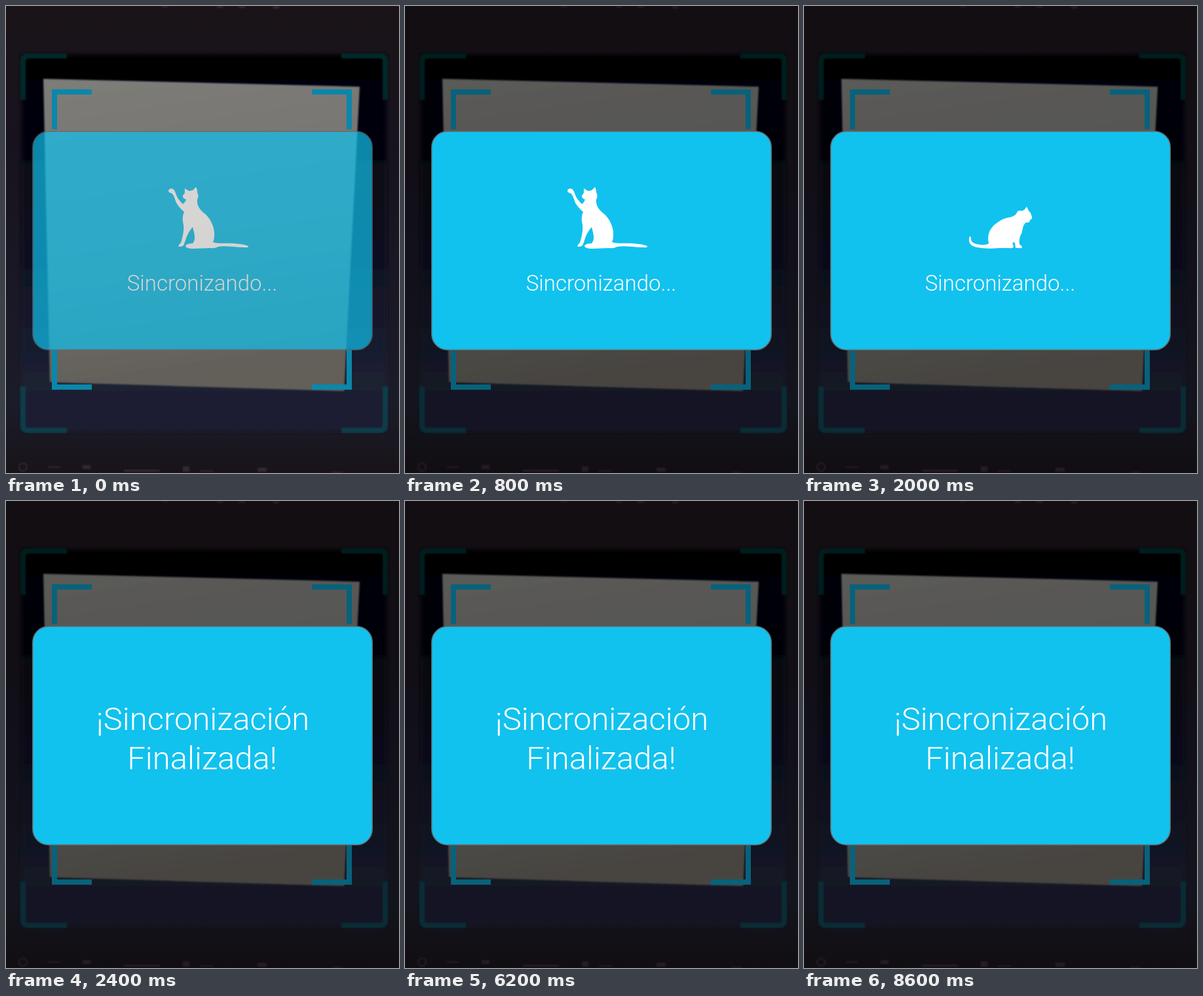
Animation of 600x712 px, one loop 9.4 s. Source, as an HTML page:

```html
<!DOCTYPE html>
<html lang="es">
<head>
<meta charset="utf-8">
<title>Sincronizando</title>
<style>
  html, body { margin: 0; width: 100%; height: 100%; overflow: hidden; background: #171217; }
  svg { display: block; width: 600px; height: 712px; }
  text { font-family: Roboto, "Open Sans", sans-serif; font-weight: 300; fill: #fff; text-anchor: middle; }
  .corner { fill: none; stroke-width: 8; }
</style>
</head>
<body>
<svg viewBox="0 0 600 712">
  <defs>
    <linearGradient id="room" x1="0" y1="0" x2="0" y2="1">
      <stop offset="0" stop-color="#1a1418"/>
      <stop offset=".3" stop-color="#17131e"/>
      <stop offset=".85" stop-color="#1b1c29"/>
      <stop offset="1" stop-color="#181419"/>
    </linearGradient>
    <linearGradient id="screen" x1="0" y1="0" x2="0" y2="1">
      <stop offset="0" stop-color="#020204"/>
      <stop offset=".2" stop-color="#04040c"/>
      <stop offset=".5" stop-color="#0d0e20"/>
      <stop offset=".85" stop-color="#1b2033"/>
      <stop offset="1" stop-color="#1d1f30"/>
    </linearGradient>
    <linearGradient id="sheet" x1="0" y1="0" x2=".15" y2="1">
      <stop offset="0" stop-color="#7d7c79"/>
      <stop offset=".5" stop-color="#75746f"/>
      <stop offset="1" stop-color="#63605a"/>
    </linearGradient>
    <filter id="soft"><feGaussianBlur stdDeviation="3"/></filter>
    <filter id="blur"><feGaussianBlur stdDeviation="1"/></filter>
  </defs>

  <rect width="600" height="712" fill="url(#room)"/>
  <rect x="24" y="74" width="557" height="574" fill="url(#screen)" filter="url(#soft)"/>
  <g fill="#322c33" filter="url(#blur)">
    <path d="M238 0h10v2h-10zM322 0h9v3h-9zM355 0h10v3h-10zM408 0h9v4h-9z"/>
    <path d="M64 702h18v2h-18zM117 700h12v6h-12zM180 707h55v3h-55zM270 702h10v8h-10zM296 708h20v2h-20zM384 704h14v6h-14zM498 710h16v2h-16z"/>
    <circle cx="26" cy="703" r="6" fill="none" stroke="#322c33" stroke-width="2"/>
  </g>
  <g id="outer" filter="url(#blur)"></g>
  <path d="M57 111L540 123L516 587L78 574L67 573Z" fill="url(#sheet)" filter="url(#blur)"/>
  <g id="inner"></g>
  <rect id="dim" width="600" height="712" opacity="0"/>

  <g id="card">
    <rect x="40.75" y="191.25" width="518.5" height="333" rx="24" fill="#11c2ee" stroke="#666a6c" stroke-width="1.5"/>
    <path id="waving" fill="#fff" d="M248 281Q250 277 255 279C259 282 259 288 263 294Q267 299 270 302Q274 299 275 295
      Q269 293 270 289L273 285L273 278L279 282L285 281L290 276Q292 279 292 284Q295 290 292 295
      C291 304 296 311 304 317C314 326 319 340 318 350Q318 356 316 360C326 363 336 361 348 362
      Q364 363 370 366Q370 369 364 368C348 368 336 365 324 367Q318 370 312 369L286 370
      Q275 370 274 366Q275 362 285 362Q290 356 287 345L285 337Q278 345 275 354L272 363
      Q271 367 264 367Q262 365 267 361C270 351 272 342 271 334Q268 322 272 314
      Q264 307 260 300C257 292 256 287 252 285Q248 285 248 281Z"/>
    <path id="resting" fill="#fff" opacity="0" d="M253 351Q256 352 255 356C256 362 264 364 273 364Q279 364 282 362
      C279 349 284 338 294 331Q304 323 315 322Q323 320 325 315L327 312Q333 313 336 311L340 306L343 312
      Q347 316 348 321Q349 325 345 326Q345 331 339 330Q335 333 334 339Q333 346 330 351
      Q328 358 329 363L333 367Q334 370 328 369L323 369L322 361L319 360Q318 363 320 366Q320 370 314 369
      L298 369Q280 371 264 368C253 366 250 359 253 351Z"/>
    <text id="busy" x="299.5" y="434" font-size="33">Sincronizando...</text>
    <g id="done" font-size="49" opacity="0">
      <text x="300.5" y="349">¡Sincronización</text>
      <text x="299.5" y="409">Finalizada!</text>
    </g>
  </g>
</svg>
<script>
const LOOP = 9400;
const $ = id => document.getElementById(id);

// Four L-shaped corners of a frame, centred on the stroke.
function corners(id, [x0, y0, x1, y1], len, r, colors) {
  for (const [x, y, sx, sy] of [[x0, y0, 1, 1], [x1, y0, -1, 1], [x0, y1, 1, -1], [x1, y1, -1, -1]]) {
    const p = document.createElementNS("http://www.w3.org/2000/svg", "path");
    p.setAttribute("class", "corner");
    p.setAttribute("stroke", colors[sy > 0 ? 0 : 1]);
    p.setAttribute("d", `M${x + sx * len} ${y}L${x + sx * r} ${y}Q${x} ${y} ${x} ${y + sy * r}L${x} ${y + sy * len}`);
    $(id).append(p);
  }
}
corners("outer", [26, 76, 579, 647], 67, 8, ["#05292b", "#0a3d49"]);
corners("inner", [74, 131, 524, 581], 57, 0, ["#0b87aa", "#0b87aa"]);

// Opacity steps: [time in ms, value], each held until the next.
const steps = {
  card:    [[0, .7], [200, 1]],
  dim:     [[0, 0], [200, .28]],
  waving:  [[0, 1], [1400, .2], [1600, 0]],
  resting: [[0, 0], [1400, .93], [1600, 1], [2400, 0]],
  busy:    [[0, 1], [2400, 0]],
  done:    [[0, 0], [2400, 1]]
};
for (const [id, list] of Object.entries(steps)) {
  const frames = list.map(([t, opacity]) => ({ offset: t / LOOP, opacity, easing: "step-end" }));
  frames.push({ offset: 1, opacity: list.at(-1)[1] });
  $(id).animate(frames, { duration: LOOP, iterations: Infinity });
}
</script>
</body>
</html>
```
